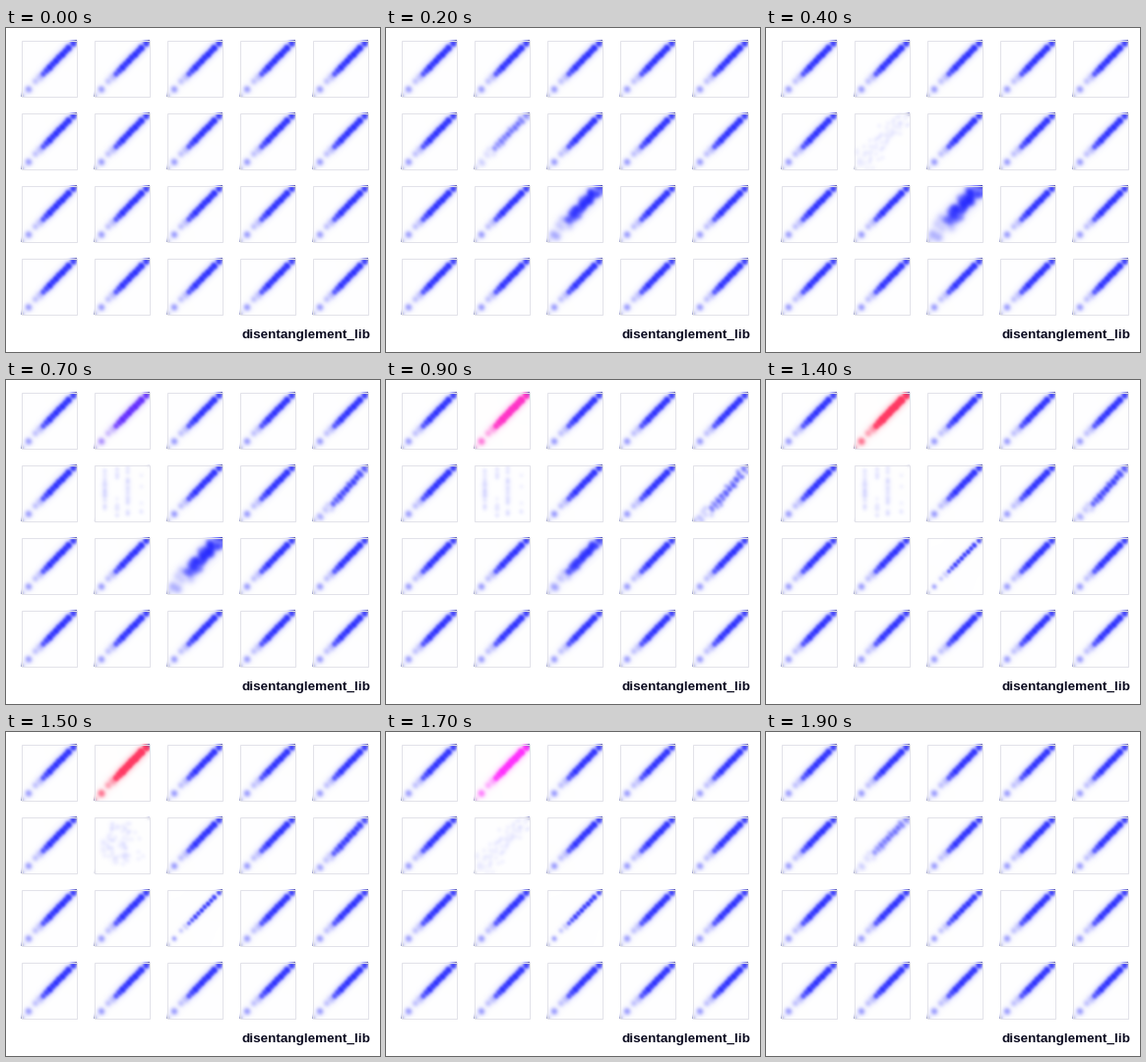
Recreate the animation shown at these times as a matplotlib script. Size 380 by 330 pixels, loop 2000 ms.

```python
import colorsys

import matplotlib.pyplot as plt
import numpy as np
from matplotlib.animation import FuncAnimation
from matplotlib.patches import Rectangle

W, H, DPI = 380, 330, 100
FRAMES, STEP = 20, 100
PW, PH = 57, 58
LEFTS = [15 + 74 * c for c in range(5)]
TOPS = [12 + 74 * r for r in range(4)]
SIGMA = 0.034
BLUE, RED = 0.664, 0.965

# Sample points along the diagonal: a sparse tail, a row of blobs, an end blob
rng = np.random.default_rng(4)
PER_BLOB = 6
blobs = np.linspace(0.4, 0.855, 9)
power = np.clip(0.85 + (blobs - 0.4) * 7, 0, 1.75) * rng.uniform(0.85, 1.15, 9)
tail = np.repeat([0.03, 0.135, 0.265, 0.34], 2)
tip = np.full(4, 0.935)
S = np.concatenate([tail, np.repeat(blobs, PER_BLOB), tip])
WEIGHT = np.concatenate([
    np.repeat([0.05, 0.23, 0.12, 0.14], 2),
    np.repeat(power / PER_BLOB, PER_BLOB),
    np.full(tip.size, 0.4),
])
N = S.size
SIZE = np.where(S < 0.38, 1.25, 1.0)
NOISE = np.abs(rng.normal(0, 1, N)) * np.tile([1, -1], N // 2)
DRIFT = rng.uniform(-1, 1, N)
EVEN = np.linspace(0.1, 0.95, N)
HEIGHT = rng.permutation(np.linspace(0.1, 0.95, N))
STRIPES = rng.choice([0.2, 0.42, 0.61, 0.85], N, p=[0.45, 0.24, 0.24, 0.07])

GX = (np.arange(PW) + 0.5) / PW
GY = 1 - (np.arange(PH) + 0.5) / PH


def smooth(v):
    v = np.clip(v, 0, 1)
    return v * v * (3 - 2 * v)


def density(x, y, weight, sigma):
    """Sum of round blobs, each with a faint wide halo."""
    total = np.zeros((PH, PW))
    for scale, share in ((1, 1), (2, 0.06)):
        gx = np.exp(-((GX[:, None] - x) / (sigma * scale)) ** 2 / 2)
        gy = np.exp(-((GY[:, None] - y) / (sigma * scale)) ** 2 / 2)
        total += share * (gy * weight) @ gx.T
    return total


def mix(img, color, alpha):
    a = np.clip(alpha, 0, 1)[..., None]
    return img * (1 - a) + np.array(color) * a


def spot(p, sigma):
    return density(np.array([p]), np.array([p]), 1.0, sigma)


def paint(dens, warm=0.0, corner=1.0):
    """Turn a density into a tinted panel with its two dark corners."""
    hue = BLUE + (RED - BLUE) * warm
    color = colorsys.hsv_to_rgb(hue, 0.93 - 0.12 * warm, 1)
    alpha = 0.97 * (1 - np.exp(-dens * (1 + 1.1 * warm)))
    img = mix(np.ones((PH, PW, 3)), color, alpha)
    img = mix(img, (0.2, 0.2, 0.6), 0.7 * corner * spot(1, 0.036))
    return mix(img, (0.35, 0.38, 0.6), 0.5 * corner * spot(0, 0.032))


def diagonal(width=1.0):
    extra = max(width - 1, 0)
    off = NOISE * (0.009 + 0.048 * extra)
    s = S + DRIFT * 0.06 * extra
    return density(s + off, s - off, WEIGHT * width ** 0.4,
                   SIGMA * SIZE * width ** 0.6)


def scatter(u):
    """Diagonal that thins to a cloud, then falls into vertical stripes."""
    spread = min(1, 4 * u)
    off = NOISE * (0.009 + 0.065 * spread)
    base = S + (EVEN - S) * spread
    stripe = smooth((u - 0.3) / 0.55)
    x = base + off + (STRIPES - base - off) * stripe
    y = base - off + (HEIGHT - base + off) * stripe
    keep = np.exp(-22 * u)
    weight = keep * WEIGHT + (1 - keep) * 0.035
    return paint(density(x, y, weight, SIGMA * SIZE), corner=1 - u)


def bend(v):
    """Diagonal that sags into a curve and breaks up."""
    off = NOISE * (0.009 + 0.022 * v)
    s = S + (EVEN - S) * 0.4 * v
    weight = WEIGHT * (1 - 0.5 * v) + 0.05 * v
    return paint(density(s + off, s ** (1 + 0.45 * v) - off, weight,
                         SIGMA * SIZE * (1 - 0.1 * v)))


PLAIN = paint(diagonal())

fig = plt.figure(figsize=(W / DPI, H / DPI), dpi=DPI, facecolor="white")
ax = fig.add_axes([0, 0, 1, 1])
ax.axis("off")
stage = np.ones((H, W, 3))
ticks = np.arange(6) / 5
dots = dict(s=0.35, marker="s", lw=0, zorder=3)
for top in TOPS:
    for left in LEFTS:
        stage[top:top + PH, left:left + PW] = PLAIN
        ax.add_patch(Rectangle((left + 0.5, top + 0.5), PW - 1, PH - 1,
                               fill=False, ec="#e2e2e9", lw=0.72, zorder=2))
        ax.scatter(left + 0.5 + ticks * (PW - 1), np.full(6, top + PH + 0.5),
                   c="#70707e", **dots)
        ax.scatter(np.full(6, left - 1.5), top + 0.5 + ticks * (PH - 1),
                   c="#9a9aa6", **dots)

picture = ax.imshow(stage, extent=(0, W, H, 0), interpolation="nearest",
                    aspect="auto", zorder=1)
ax.set_xlim(0, W)
ax.set_ylim(H, 0)
ax.text(370, 316, "disentanglement_lib", ha="right", va="baseline",
        family="Liberation Sans", weight="bold", size=9.7, color="#0b0b20")


def place(row, col, img):
    top, left = TOPS[row], LEFTS[col]
    stage[top:top + PH, left:left + PW] = img


def draw(i):
    gap = abs(i - 10.5)
    warm = np.interp(i, [6, 7, 10, 15, 17, 19], [0, 0.15, 1, 1, 0.57, 0])
    wave = np.sin(2 * np.pi * i / FRAMES)
    width = 1 + (0.75 if wave > 0 else 0.38) * wave
    place(0, 1, paint(diagonal(), warm))
    place(1, 1, scatter(smooth((9.5 - gap) / 8)))
    place(1, 4, bend(smooth((7.5 - gap) / 7.5) ** 1.5))
    place(2, 2, paint(diagonal(width)))
    picture.set_data(np.clip(stage, 0, 1))
    return [picture]


anim = FuncAnimation(fig, draw, frames=FRAMES, interval=STEP,
                     init_func=lambda: draw(0), repeat=True, repeat_delay=0)
plt.show()
```
